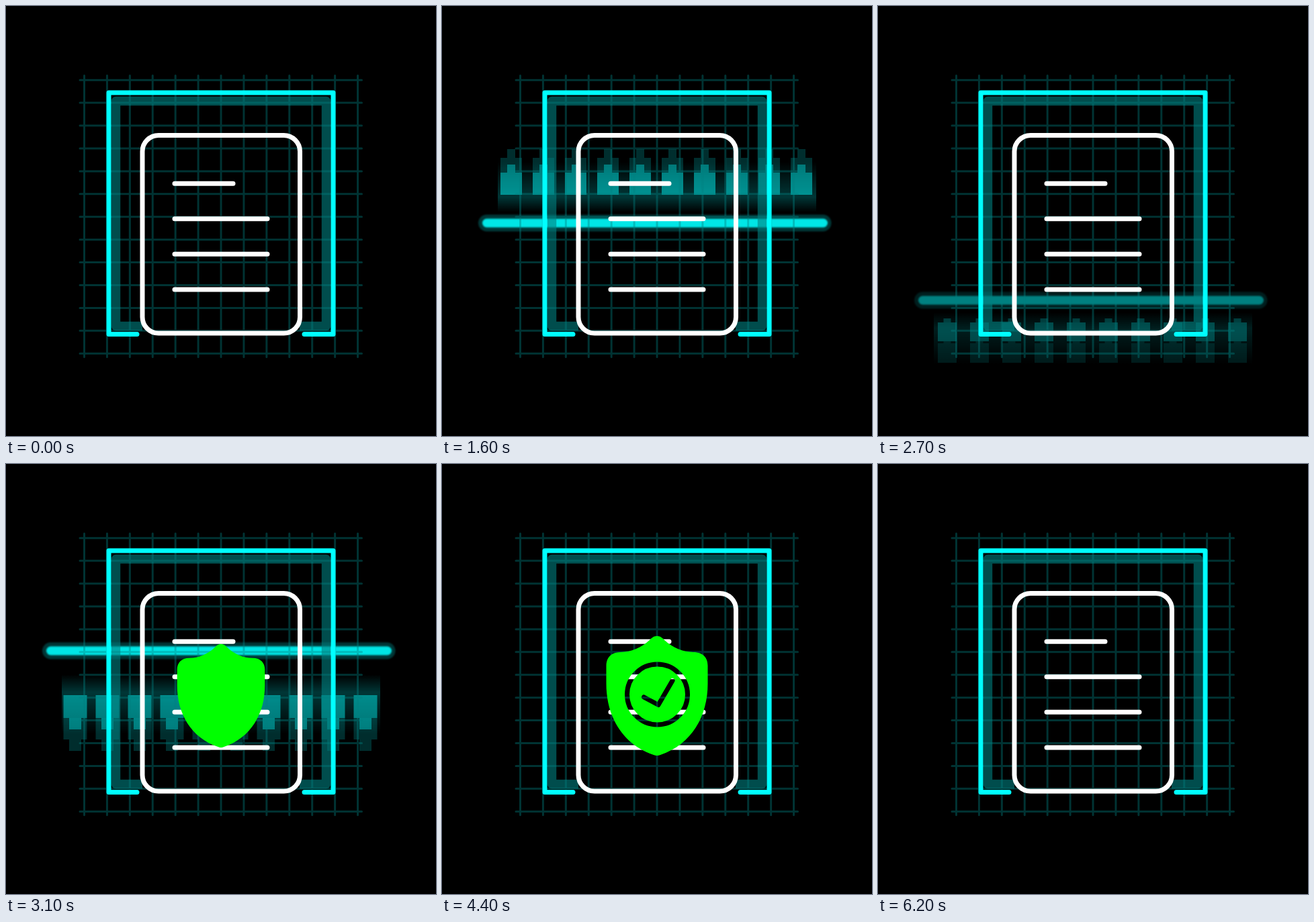
An HTML page that plays this animation: 640 px wide and 640 px high, repeating every 6.4 s.

```html
<!DOCTYPE html>
<html lang="en">
<head>
<meta charset="utf-8">
<title>Document scan</title>
<style>
  html, body { margin: 0; width: 100%; height: 100%; overflow: hidden; background: #000; }
  svg { display: block; width: 100vw; height: 100vh; }
  .line { fill: none; stroke-width: 7; stroke-linecap: round; stroke-linejoin: round; }
</style>
</head>
<body>
<svg viewBox="0 0 640 640">
  <defs>
    <linearGradient id="fade" x1="0" y1="0" x2="0" y2="1">
      <stop offset="0" stop-color="#0ff" stop-opacity="0"/>
      <stop offset=".3" stop-color="#0ff" stop-opacity=".24"/>
      <stop offset="1" stop-color="#0ff" stop-opacity="0"/>
    </linearGradient>
    <filter id="soft" x="-5%" y="-100%" width="110%" height="300%">
      <feGaussianBlur stdDeviation="1"/>
    </filter>
    <mask id="cut" maskUnits="userSpaceOnUse" x="-90" y="-100" width="180" height="200">
      <rect x="-90" y="-100" width="180" height="200" fill="#fff"/>
      <path id="ring" class="line" style="stroke-linecap:butt" stroke="#000" pathLength="1"
        d="M-44.5-2A45 45 0 0 1 45.5-2A45 45 0 0 1-44.5-2"/>
      <path id="check" class="line" stroke="#000" pathLength="1" d="M-19.5 2L2 13.5L23-22.5"/>
    </mask>
  </defs>

  <rect width="640" height="640"/>

  <g id="scanner">
    <g id="trail" fill="#0ff">
      <rect id="glow" x="-237" width="474" fill="url(#fade)"/>
    </g>
    <g fill="#0ff" filter="url(#soft)">
      <rect x="-266" y="-12.5" width="525.5" height="25" rx="12.5" opacity=".24"/>
      <rect x="-260" y="-6.5" width="514" height="13" rx="6.5"/>
    </g>
  </g>

  <path id="grid" fill="none" stroke="#008080" stroke-opacity=".4" stroke-width="3" stroke-linecap="round"/>

  <path fill="none" stroke="#008080" stroke-opacity=".6" stroke-width="13.5" stroke-linejoin="round"
    d="M203 476.5H163.5V141.5H476.5V476.5H437"/>
  <path class="line" stroke="#0ff" d="M195 488.5H153V129H487V488.5H444"/>

  <g class="line" stroke="#fff">
    <rect x="203" y="192.5" width="234.5" height="294.5" rx="24"/>
    <path d="M251 264.3H338M251 316.7H389M251 369.3H389M251 422H389"/>
  </g>

  <g id="shield">
    <path fill="#0f0" mask="url(#cut)" d="M0-89C5-89 8-86 11-83C24-71 38-65.500 54-65C69-65 75.500-56 75.500-45V-18
      C75.500 30 52 72 5 88Q0 90-5 88C-52 72-75.500 30-75.500-18V-45C-75.500-56-69-65-54-65
      C-38-65.500-24-71-11-83C-8-86-5-89 0-89Z"/>
  </g>
</svg>

<script>
const LOOP = 6400, TICK = 100;
const $ = id => document.getElementById(id);
const clamp = (v, lo = 0, hi = 1) => Math.min(hi, Math.max(lo, v));
const ramp = (t, from, to) => clamp((t - from) / (to - from));
const mix = (a, b, k) => a + (b - a) * k;

// cubic-bezier(.25, .1, .25, 1)
function ease(x) {
  let lo = 0, hi = 1;
  for (let i = 0; i < 24; i++) {
    const u = (lo + hi) / 2;
    if (.75 * u * (1 - u) + u ** 3 < x) lo = u; else hi = u;
  }
  return .3 * lo * (1 - lo) ** 2 + 3 * lo * lo * (1 - lo) + lo ** 3;
}

// Block rows: opacity, then [near, far, half width] behind the bar at two moments 400 ms apart.
const passes = [
  {
    start: 1150, end: 2200, fadeOut: 350, mark: 1600, y: 323, speed: .345, side: -1,
    glow: [[16, 92], [0, 92]],
    rows: [
      [.53, [42, 75, 16], [43, 66, 11]],
      [.2, [75, 97, 16], [66, 88, 11]],
      [.4, [75, 87, 6], [88, 89, 1]],
      [.2, [97, 110, 6], [111, 112, 1]],
      [.3, [30, 30, 13], [11, 32, 13]]
    ]
  },
  {
    start: 2600, end: 3400, fadeOut: 200, mark: 2700, y: 438, speed: -.4, side: 1,
    glow: [[18, 96], [35, 125]],
    rows: [
      [.5, [33, 61, 14], [66, 100, 17.5]],
      [.2, [64, 93, 14], [100, 132, 17.5]],
      [.42, [27, 33, 5.5], [100, 117, 9]],
      [.2, [61, 64, 5.5], [132, 149, 9]]
    ]
  }
];

const rowPaths = passes[0].rows.map(() =>
  $('trail').appendChild(document.createElementNS('http://www.w3.org/2000/svg', 'path')));

let grid = '';
for (let i = 0; i < 13; i++) {
  const step = i * 33.92;
  grid += `M${116.5 + step} 103.5V522.5M110 ${110.2 + step}H529.5`;
}
$('grid').setAttribute('d', grid);

function columns(near, far, half) {
  if (far <= near || half <= 0) return '';
  let d = '';
  for (let i = 0; i < 10; i++) d += `M${-217 + 48 * i - half} ${near}h${2 * half}V${far}h${-2 * half}z`;
  return d;
}

function drawScanner(t) {
  const pass = passes.find(p => t > p.start && t < p.end);
  $('scanner').style.display = pass ? '' : 'none';
  if (!pass) return;
  const y = clamp(pass.y + pass.speed * (t - pass.mark), 199.5, 482);
  const k = clamp((t - pass.mark) / 400, -.6, 1.4);
  const opacity = .9 * ramp(t, pass.start, pass.start + 180) * ramp(t, pass.end, pass.end - pass.fadeOut);
  $('scanner').setAttribute('transform', `translate(320 ${y})`);
  $('scanner').setAttribute('opacity', opacity);
  $('trail').setAttribute('transform', `scale(1 ${pass.side})`);

  const between = (a, b) => a.map((v, i) => mix(v, b[i], k));
  const [top, bottom] = between(...pass.glow);
  $('glow').setAttribute('y', top);
  $('glow').setAttribute('height', bottom - top);
  rowPaths.forEach((path, i) => {
    const row = pass.rows[i];
    path.setAttribute('d', row ? columns(...between(row[1], row[2])) : '');
    if (row) path.setAttribute('opacity', row[0]);
  });
}

function trace(id, amount) {
  const style = $(id).style;
  style.display = amount > 0 ? '' : 'none';
  style.strokeDasharray = amount < 1 ? `${amount} 2` : 'none';
}

function drawShield(t) {
  const scale = ease(ramp(t, 2700, 3400)) * (1 - ease(ramp(t, 5800, 6200)));
  $('shield').style.display = scale > .001 ? '' : 'none';
  $('shield').setAttribute('transform', `translate(320 345) scale(${scale})`);
  trace('ring', ease(ramp(t, 3400, 4100)));
  trace('check', ease(ramp(t, 4000, 4400)));
}

function draw() {
  const t = Math.floor(performance.now() % LOOP / TICK) * TICK;
  drawScanner(t);
  drawShield(t);
  requestAnimationFrame(draw);
}
draw();
</script>
</body>
</html>
```
